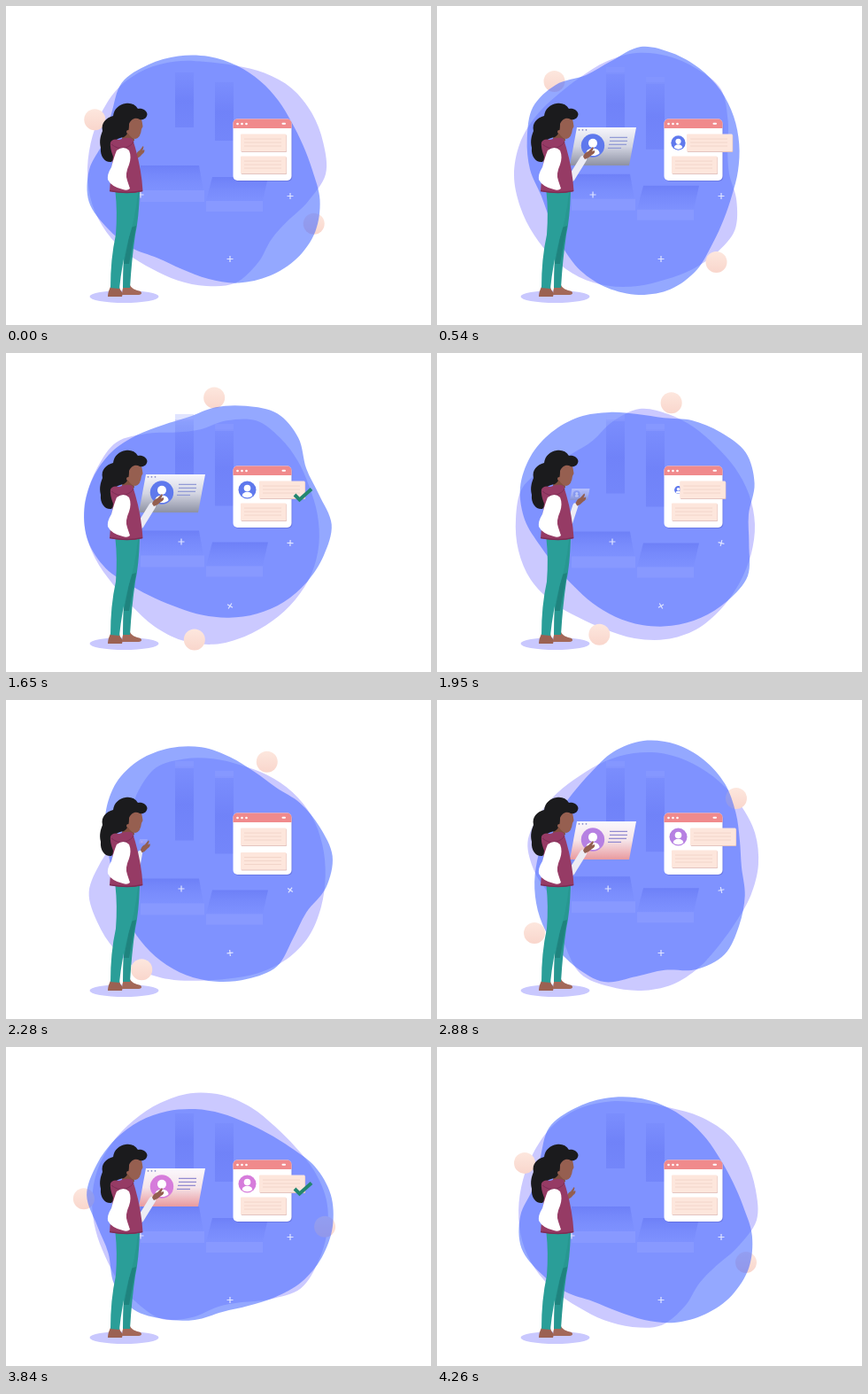
These frames come from a looping animation (480 px wide and 360 px high, 4.29 s). An HTML page with a canvas:

```html
<!DOCTYPE html>
<html lang="en">
<head>
<meta charset="utf-8">
<title>Profile card animation</title>
<style>
  html, body { margin: 0; width: 100%; height: 100%; overflow: hidden; background: #fff; }
  canvas { display: block; width: 100vw; height: 100vh; }
</style>
</head>
<body>
<canvas id="stage" width="480" height="360"></canvas>
<script>
const ctx = document.getElementById('stage').getContext('2d');
const LOOP = 4290, HALF = LOOP / 2, TAU = Math.PI * 2;

// Blob radii every 15 degrees, clockwise from the right
const BACK = [135, 119, 106, 104, 116, 127, 126, 124, 123, 126, 130, 133,
  134, 135, 137, 139, 137, 132, 127, 127, 132, 137, 138, 137];
const FRONT = [117, 130, 139, 141, 138, 132, 123, 116, 115, 124, 132, 140,
  135, 123, 127, 139, 137, 133, 128, 122, 116, 111, 108, 110];

const lerp = (a, b, u) => a + (b - a) * u;
const clamp = u => Math.max(0, Math.min(1, u));
const smooth = (t, a, b) => { const u = clamp((t - a) / (b - a)); return u * u * (3 - 2 * u); };
const pulse = (t, a, b, c, d) => smooth(t, a, b) * (1 - smooth(t, c, d));
const mix = (a, b, u) => `rgb(${a.map((v, i) => Math.round(lerp(v, b[i], u)))})`;

function fill(d, color) {
  ctx.fillStyle = color;
  ctx.fill(new Path2D(d));
}
function stroke(d, color, width) {
  ctx.strokeStyle = color;
  ctx.lineWidth = width;
  ctx.stroke(new Path2D(d));
}
function ellipse(x, y, rx, ry, color) {
  ctx.fillStyle = color;
  ctx.beginPath();
  ctx.ellipse(x, y, rx, ry, 0, 0, TAU);
  ctx.fill();
}
const dot = (x, y, r, color) => ellipse(x, y, r, r, color);
function box(x, y, w, h, r, color) {
  ctx.fillStyle = color;
  ctx.beginPath();
  ctx.roundRect(x, y, w, h, r);
  ctx.fill();
}
function fade(y0, y1, ...colors) {
  const g = ctx.createLinearGradient(0, y0, 0, y1);
  colors.forEach((c, i) => g.addColorStop(i / (colors.length - 1), c));
  return g;
}
function group(x, y, draw) {
  ctx.save();
  ctx.translate(x, y);
  draw();
  ctx.restore();
}

function blob(x, y, radii, turn, color) {
  const n = radii.length;
  const pts = radii.map((r, i) => {
    const a = i * TAU / n + turn;
    return [x + r * Math.cos(a), y + r * Math.sin(a)];
  });
  const at = i => pts[(i + n) % n];
  ctx.beginPath();
  ctx.moveTo(...pts[0]);
  for (let i = 0; i < n; i++) {
    const [p, q, r, s] = [at(i - 1), at(i), at(i + 1), at(i + 2)];
    ctx.bezierCurveTo(q[0] + (r[0] - p[0]) / 6, q[1] + (r[1] - p[1]) / 6,
      r[0] - (s[0] - q[0]) / 6, r[1] - (s[1] - q[1]) / 6, ...r);
  }
  ctx.fillStyle = color;
  ctx.fill();
}

function orbs(t) {
  for (const side of [0, Math.PI]) {
    const a = (205.4 / 360 + t / LOOP / 2) * TAU + side;
    const x = 224 + 137 * Math.cos(a), y = 187 + 137 * Math.sin(a);
    dot(x, y, 12, fade(y - 12, y + 12, '#fde7de', '#f9d6cc'));
  }
}

function scenery(t) {
  const u = clamp(t / 2100);
  const dy = 21.5 * u * (2 - u) * (1 - smooth(t, 2700, 3600));
  for (const [x, top, bottom] of [[191, 77, 137], [236, 88, 152]]) {
    const end = bottom + dy;
    box(x, top - 2, 21, end - top + 2, 0,
      fade(top, end, 'rgba(104,122,245,.2)', 'rgba(104,122,245,.65)', 'rgba(104,122,245,.5)'));
    box(x, top - 8, 21, 8, 0, `rgba(150,165,255,${dy / 70})`);
  }
  group(0, dy, () => {
    const shade = y => fade(y, y + 26, 'rgba(98,116,242,.6)', 'rgba(110,130,248,.1)');
    fill('M152 180H218L223 208H152Z', shade(180));
    box(152, 208, 72, 13, 0, 'rgba(146,163,255,.45)');
    fill('M233 193H296L290 220H226Z', shade(193));
    box(226, 220, 64, 12, 0, 'rgba(146,163,255,.45)');
  });
}

function star(x, y, turn) {
  group(x, y, () => {
    ctx.rotate(turn * Math.PI / 2);
    stroke('M-3.5 0H3.5M0-3.5V3.5', '#dfe4ff', 1.2);
  });
}
function stars(t) {
  star(lerp(152, 198, pulse(t, 0, 1050, 2700, 3600)), 213, smooth(t, 500, 1650));
  star(321, 214.5, smooth(t, 1500, 3300));
  star(253, 285.5, smooth(t, 1080, 2500));
}

function person(x, y, r, color) {
  dot(x, y, r, color);
  ctx.save();
  ctx.beginPath();
  ctx.arc(x, y, r * .88, 0, TAU);
  ctx.clip();
  ellipse(x, y + r * .72, r * .6, r * .5, '#fff');
  dot(x, y - r * .2, r * .38, '#fff');
  ctx.restore();
}

function panel(x, y) {
  box(x + .6, y + 1, 51.5, 19.5, 1, '#e3c4c0');
  box(x, y, 51.5, 19.5, 1, '#fde6dc');
  stroke(`M${x + 4} ${y + 5.5}h42M${x + 4} ${y + 9.5}h42M${x + 4} ${y + 13.5}h42`, '#f2d5ca', 1);
}

function browser(c, color) {
  const open = pulse(c, 280, 640, 1800, 2080);
  box(257.3, 128.5, 66, 69.5, 5, 'rgba(80,85,190,.4)');
  box(256.5, 127.5, 66, 69.5, 5, '#fff');
  box(256.5, 127.5, 66, 10.5, [5, 5, 0, 0], '#f08a8c');
  [261.5, 266.5, 271.5].forEach(x => dot(x, 133, 1.3, '#fff'));
  box(311.5, 131.7, 4.5, 2, 1, '#fff');
  const r = 10 * open;
  if (r > .2) person(272.5, 154.5, r, color);
  panel(lerp(265, 286, open), 144.5);
  panel(265, 169.5 + 2.5 * pulse(c, 0, 135, 200, 500));
}

function check(c) {
  const grow = smooth(c, 1400, 1620);
  const shown = 1 - smooth(c, 1800, 1950);
  if (!grow || !shown) return;
  ctx.save();
  ctx.globalAlpha = shown;
  ctx.setLineDash([27 * grow, 60]);
  stroke('M326 160L331.5 165.5L345 153.5', '#23866f', 4);
  ctx.restore();
}

function card(c, second, color) {
  const size = pulse(c, 50, 430, 1760, 2060);
  if (size < .02) return;
  ctx.save();
  ctx.translate(150, 160);
  ctx.scale(size, size);
  ctx.translate(-150, -160);
  ctx.globalAlpha = Math.min(1, size * 1.5);
  fill('M158 137H225L217 180H150Z', second
    ? fade(137, 180, '#fbf8fd', '#f5e4e9', '#e99a9e')
    : fade(137, 180, '#f6f6fc', '#d3d5e2', '#8d91a3'));
  [160.5, 164.5, 168.5].forEach(x => dot(x, 139.8, .9, '#858ac9'));
  person(176, 157.5, 13.2, color);
  stroke('M195 148.3H215M195 152.3H215M194 156.3H214M193 160.3H208', second ? '#928bd0' : '#929bd5', 1.2);
  ctx.restore();
}

function forearm(c) {
  const reach = pulse(c, 0, 380, 1800, 2120);
  const x = lerp(148, 167, reach), y = lerp(168, 169, reach);
  const elbow = lerp(146, 152, reach);
  ctx.save();
  ctx.lineCap = ctx.lineJoin = 'round';
  stroke(`M146 190L${elbow} 194L${x - 2} ${y + 4}`, '#ececf4', lerp(4, 8, reach));
  ctx.restore();
  group(x, y, () => {
    ctx.scale(lerp(.75, 1, reach), 1);
    fill('M-2 1Q0-4 4-5L9-10Q11-9 8-5L11-6Q12-3 8-1Q4 3 0 4Z', '#935e4f');
  });
}

function woman(c) {
  ellipse(133.5, 328, 39, 7, '#c9c8fe');
  // feet and trousers
  fill('M119 315L128 316Q128 320 132 324L131 328H115Q115 322 119 315Z', '#9b6152');
  fill('M133 315L140 315Q142 320 152 322Q155 325 150 326H131Q131 320 133 315Z', '#a36859');
  fill('M140 210L151 210Q150 240 146 258Q142 285 140 318L132 318Q132 285 135 260Z', '#279791');
  fill('M141 250L147 248L139 291L133 291Z', '#1f837e');
  fill('M123.500 210H149Q146 240 138 264Q131 290 128 319L118 318Q118 285 124 258Q126 232 123.500 210Z', '#2a9e98');
  forearm(c);
  // head
  fill('M132 138L143 138L145 152Q137 157 131 151Z', '#82503f');
  fill('M137 127L152 124Q154 131 154.500 136L153 139Q152 149 146 150Q138 149 136 137Z', '#965f50');
  fill('M135 110C141 109 146 111 149 116C154 115 159 118 159.500 122C159 127 155 129 151 128' +
    'C146 125 141 128 139 133C139 140 138 145 133 148C126 149 121 152 122 158' +
    'C124 166 123 172 119 176C112 177 106 170 107 160C105 152 107 146 109 141' +
    'C107 132 113 126 121 124C122 116 128 111 135 110Z', '#1b1b1d');
  dot(138, 142, 2, '#965f50');
  // vest and near sleeve
  fill('M118 154Q120 149 128 151Q137 147 143 150L146 160Q153 184 154.500 209' +
    'Q138 213 117 209Q118 190 121 170Q117 160 118 153Z', '#963b65');
  stroke('M119 156Q126 162 134 160T144 153', '#7d2d55', 1);
  stroke('M117 208.500Q138 212.500 154 208.500', '#7d2d55', 1.5);
  fill('M125 163Q133 157 139 163Q142 170 139 179Q134 190 137 197L140 206' +
    'Q137 209 132 207Q119 204 115 196Q114 190 119 182Q122 170 125 163Z', '#fff');
}

function draw(t) {
  const turn = t / LOOP * TAU;
  const second = t >= HALF, c = t % HALF;
  const color = second ? mix([182, 128, 226], [214, 124, 219], clamp((c - 735) / 510)) : '#5f79ed';
  ctx.clearRect(0, 0, 480, 360);
  blob(226, 190, BACK, -turn, '#cbc9ff');
  orbs(t);
  blob(229, 185, FRONT, turn, 'rgba(77,110,255,.6)');
  scenery(t);
  stars(t);
  browser(c, color);
  check(c);
  card(c, second, color);
  woman(c);
}

function tick() {
  draw(performance.now() % LOOP);
  requestAnimationFrame(tick);
}
tick();
</script>
</body>
</html>
```
